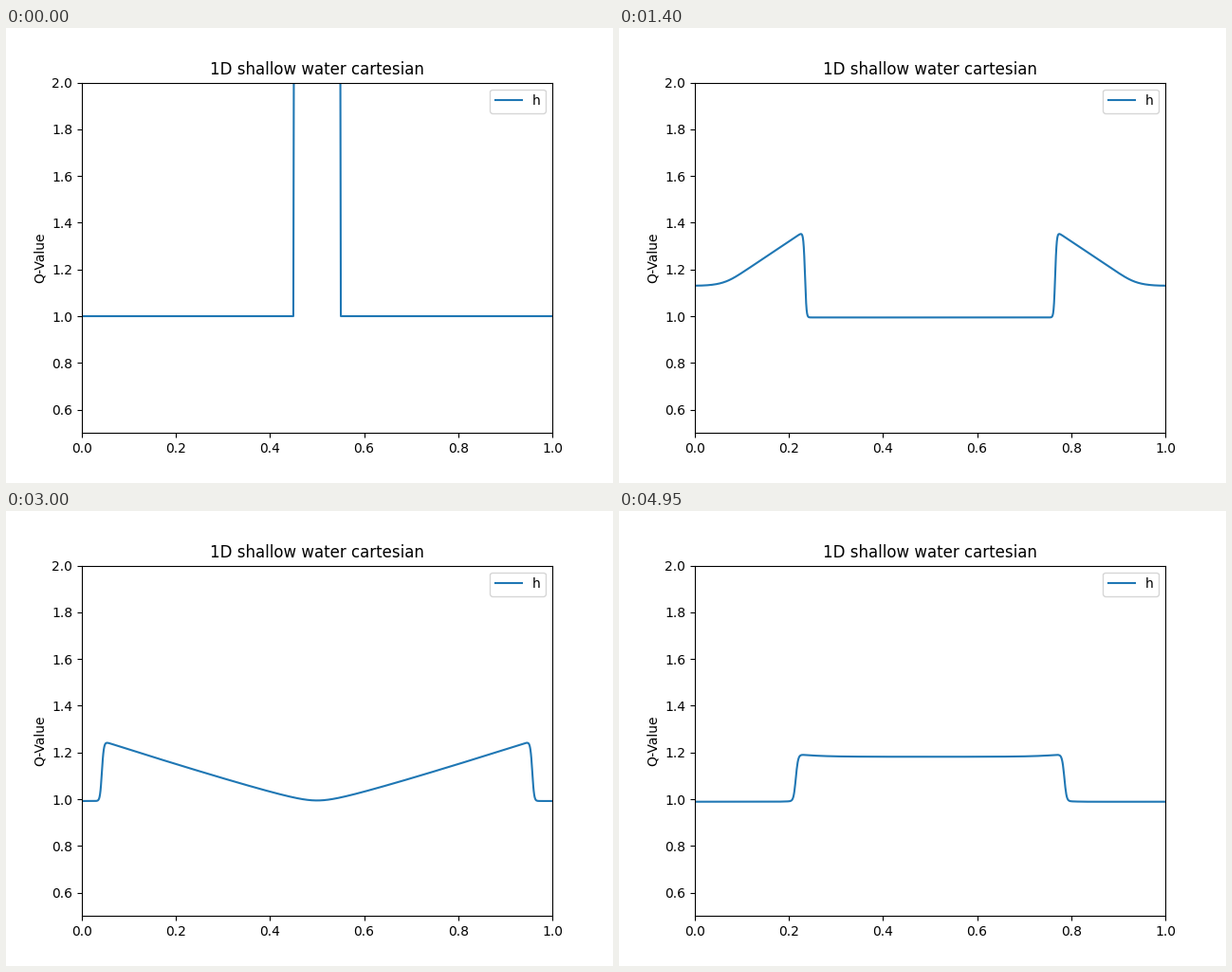
Recreate the animation shown at these times as a matplotlib script. Size 640 px wide and 480 px high, loop 5 s.

```python
import numpy as np
import matplotlib.pyplot as plt
from matplotlib.animation import FuncAnimation

GRAVITY = 9.81
CELLS = 1000
CFL = 0.45
FRAMES = 100
FRAME_TIME = 0.006  # simulated seconds per frame

dx = 1 / CELLS
x = (np.arange(CELLS) + 0.5) * dx


def hll_flux(h, q):
    """HLL fluxes of mass and momentum at every cell interface."""
    u = q / h
    c = np.sqrt(GRAVITY * h)
    slow, fast = u - c, u + c
    left = np.minimum(np.minimum(slow[:-1], slow[1:]), 0)
    right = np.maximum(np.maximum(fast[:-1], fast[1:]), 0)
    span = right - left

    def blend(state, flux):
        return (right * flux[:-1] - left * flux[1:]
                + left * right * (state[1:] - state[:-1])) / span

    return blend(h, q), blend(q, q * u + 0.5 * GRAVITY * h * h)


def advance(h, q, duration):
    """Step the shallow water equations forward between reflecting walls."""
    remaining = duration
    while remaining > 1e-12:
        speed = np.max(np.abs(q / h) + np.sqrt(GRAVITY * h))
        dt = min(CFL * dx / speed, remaining)
        mass, momentum = hll_flux(
            np.concatenate((h[:1], h, h[-1:])),
            np.concatenate((-q[:1], q, -q[-1:])),
        )
        h = h - dt / dx * np.diff(mass)
        q = q - dt / dx * np.diff(momentum)
        remaining -= dt
    return h, q


def simulate():
    h = np.where(np.abs(x - 0.5) < 0.05, 2.0, 1.0)
    q = np.zeros(CELLS)
    depths = [h]
    for _ in range(FRAMES - 1):
        h, q = advance(h, q, FRAME_TIME)
        depths.append(h)
    return depths


depths = simulate()

plt.rcParams["font.family"] = "DejaVu Sans"
fig, ax = plt.subplots(figsize=(6.4, 4.8), dpi=100)
line, = ax.plot(x, depths[0], label="h")
ax.set_xlim(0, 1)
ax.set_ylim(0.5, 2)
ax.set_title("1D shallow water cartesian")
ax.set_ylabel("Q-Value")
ax.legend(loc="upper right")


def update(frame):
    line.set_ydata(depths[frame])
    return line,


anim = FuncAnimation(fig, update, frames=FRAMES, interval=50, repeat=True)
plt.show()
```
